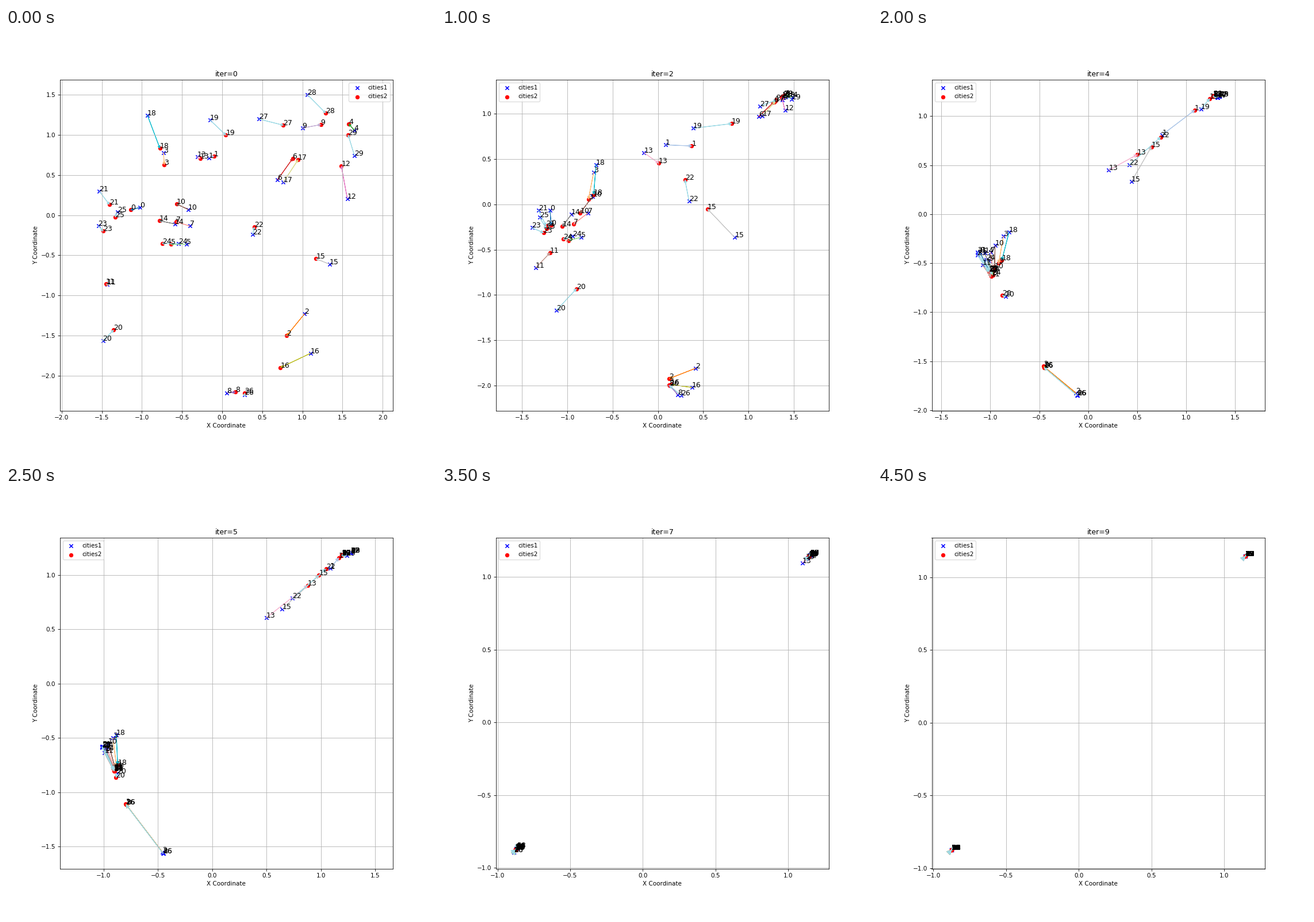
A matplotlib script for the animation above (5000 ms loop, 748 by 748 pixels).

```python
import numpy as np
import matplotlib.pyplot as plt
from matplotlib.animation import FuncAnimation

CITIES = 30
STEPS = 10
STEP_MS = 500


def standardize(pts):
    return (pts - pts.mean(axis=0)) / pts.std(axis=0)


def attend(pts):
    """One step of softmax self-attention, rescaled to unit variance."""
    score = pts @ pts.T
    weight = np.exp(score - score.max(axis=1, keepdims=True))
    weight /= weight.sum(axis=1, keepdims=True)
    return standardize(weight @ pts)


states = [standardize(np.random.RandomState(1234).rand(CITIES, 2))]
for _ in range(STEPS):
    states.append(attend(states[-1]))

fig, ax = plt.subplots(figsize=(10, 10), dpi=74.8)


def draw(k):
    old, new = states[k], states[k + 1]
    ax.clear()
    ax.scatter(*old.T, color="blue", marker="x", label="cities1")
    ax.scatter(*new.T, color="red", marker="o", label="cities2")
    for i, (a, b) in enumerate(zip(old, new)):
        ax.arrow(*a, *(b - a), head_width=0.03, head_length=0.03,
                 length_includes_head=True, color=plt.cm.tab20(i))
        for x, y in (a, b):
            ax.text(x, y, str(i), fontsize=12)
    ax.set_title(f"iter={k}")
    ax.set_xlabel("X Coordinate")
    ax.set_ylabel("Y Coordinate")
    ax.legend(loc="upper left" if k else "upper right")
    ax.grid(True)
    ax.axis("equal")
    return []


anim = FuncAnimation(fig, draw, frames=STEPS, init_func=lambda: [],
                     interval=STEP_MS, repeat=True)
plt.show()
```
